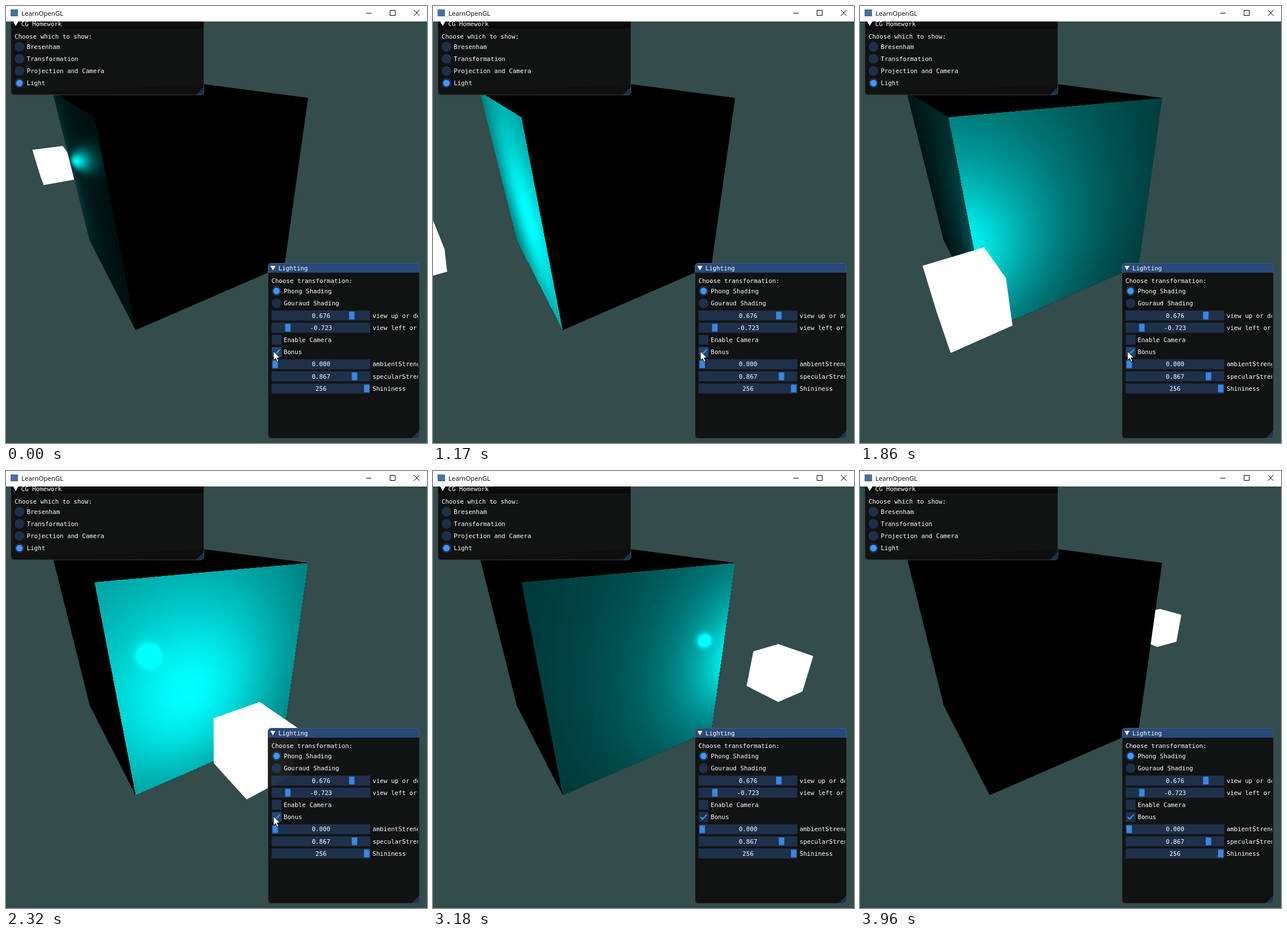
An HTML page with a canvas for the animation above (4.04 s loop, 735 px wide and 762 px high).

```html
<!DOCTYPE html>
<html lang="en">
<head>
<meta charset="utf-8">
<title>LearnOpenGL</title>
<style>
html, body { margin: 0; width: 100%; height: 100%; overflow: hidden; background: #334c4c; }
canvas { display: block; }
</style>
</head>
<body>
<canvas id="stage" width="735" height="762"></canvas>
<script>
const ctx = document.getElementById('stage').getContext('2d');
const SIZE = 735, BAR = 27, MID = SIZE / 2, LOOP = 4040;
const MONO = '10.7px "DejaVu Sans Mono", "Noto Sans Mono", monospace';

// Camera: 70 degree field of view, unit cube at the world origin.
const rad = a => a * Math.PI / 180;
const FOCAL = MID / Math.tan(rad(35));
const EYE = [-0.721, 0.672, 1.598];
const sy = Math.sin(rad(32.4)), cy = Math.cos(rad(32.4));
const sp = Math.sin(rad(30.25)), cp = Math.cos(rad(30.25));
const RIGHT = [cy, 0, sy];
const UP = [sy * sp, cp, -cy * sp];
const AHEAD = [sy * cp, -sp, -cy * cp];
const SPECULAR = 0.867, SHININESS = 256;

const dot = (a, b) => a[0] * b[0] + a[1] * b[1] + a[2] * b[2];
const sub = (a, b) => [a[0] - b[0], a[1] - b[1], a[2] - b[2]];

function project(p) {
  const v = sub(p, EYE), k = FOCAL / dot(v, AHEAD);
  return [MID + dot(v, RIGHT) * k, BAR + MID - dot(v, UP) * k];
}

function hull(points) {
  points.sort((a, b) => a[0] - b[0] || a[1] - b[1]);
  const half = list => {
    const out = [];
    for (const p of list) {
      while (out.length > 1) {
        const a = out[out.length - 2], b = out[out.length - 1];
        if ((b[0] - a[0]) * (p[1] - a[1]) - (b[1] - a[1]) * (p[0] - a[0]) > 0) break;
        out.pop();
      }
      out.push(p);
    }
    out.pop();
    return out;
  };
  return half(points).concat(half(points.slice().reverse()));
}

function poly(points, fill) {
  ctx.beginPath();
  points.forEach(p => ctx.lineTo(p[0], p[1]));
  ctx.closePath();
  ctx.fillStyle = fill;
  ctx.fill();
}

function box(center, h, fill) {
  const pts = [];
  for (const x of [-h, h]) for (const y of [-h, h]) for (const z of [-h, h])
    pts.push(project([center[0] + x, center[1] + y, center[2] + z]));
  poly(hull(pts), fill);
}

// Phong shading of the two visible side faces, traced per pixel.
const AREA = { x: 74, y: 140, w: 460, h: 430 };
const layer = document.createElement('canvas');
layer.width = AREA.w;
layer.height = AREA.h;
const layerCtx = layer.getContext('2d');
const image = layerCtx.createImageData(AREA.w, AREA.h);
const FACES = [{ axis: 2, side: 1 }, { axis: 0, side: -1 }];

function phong(p, face, light) {
  const l = sub(light, p), v = sub(EYE, p);
  const ll = Math.hypot(...l), vl = Math.hypot(...v);
  const nl = l[face.axis] * face.side / ll;
  if (nl <= 0) return 0;
  const nv = v[face.axis] * face.side / vl;
  const shine = Math.max(0, 2 * nl * nv - dot(l, v) / (ll * vl));
  return Math.min(1, nl + SPECULAR * Math.pow(shine, SHININESS));
}

function shade(light) {
  const data = image.data;
  data.fill(0);
  const lit = FACES.filter(f => light[f.axis] * f.side > 0.5);
  for (let j = 0; j < AREA.h; j++) {
    const b = (BAR + MID - AREA.y - j - 0.5) / FOCAL;
    for (let i = 0; i < AREA.w; i++) {
      const a = (AREA.x + i + 0.5 - MID) / FOCAL;
      const d = [0, 1, 2].map(k => RIGHT[k] * a + UP[k] * b + AHEAD[k]);
      for (const f of lit) {
        const t = (0.5 * f.side - EYE[f.axis]) / d[f.axis];
        if (t <= 0) continue;
        const p = [EYE[0] + d[0] * t, EYE[1] + d[1] * t, EYE[2] + d[2] * t];
        if (Math.abs(p[1]) > 0.5 || Math.abs(p[2 - f.axis]) > 0.5) continue;
        const c = Math.round(255 * phong(p, f, light)), o = (j * AREA.w + i) * 4;
        data[o + 1] = data[o + 2] = c;
        data[o + 3] = 255;
      }
    }
  }
  layerCtx.putImageData(image, 0, 0);
}

function scene(angle) {
  const light = [Math.sin(angle), 0, Math.cos(angle)];
  const inFront = light[2] > 0.6 || light[0] < -0.6;
  ctx.fillStyle = '#334c4c';
  ctx.fillRect(0, 0, 735, 762);
  if (!inFront) box(light, 0.1, '#fff');
  box([0, 0, 0], 0.5, '#000');
  shade(light);
  ctx.drawImage(layer, AREA.x, AREA.y);
  if (inFront) box(light, 0.1, '#fff');
}

// Interface widgets
const FRAME = 'rgba(41,74,122,.54)', HOVER = 'rgba(66,150,250,.4)';
const MARK = '#4296fa', GRAB = '#3d85e0';

function text(s, x, y, align = 'left') {
  ctx.font = MONO;
  ctx.textAlign = align;
  ctx.fillStyle = '#fff';
  ctx.fillText(s, x, y);
}

function rect(x, y, w, h, fill) {
  ctx.fillStyle = fill;
  ctx.fillRect(x, y, w, h);
}

function disc(x, y, r, fill) {
  ctx.beginPath();
  ctx.arc(x, y, r, 0, 7);
  ctx.fillStyle = fill;
  ctx.fill();
}

function panel(x, y, w, h, title, bar) {
  ctx.save();
  ctx.beginPath();
  ctx.roundRect(x, y, w, h, 6.4);
  ctx.save();
  ctx.clip();
  rect(x, y + 17, w, h - 17, 'rgba(15,15,15,.94)');
  rect(x, y, w, 17, bar);
  poly([[x + w, y + h], [x + w - 15, y + h], [x + w, y + h - 15]], 'rgba(66,150,250,.25)');
  ctx.restore();
  ctx.beginPath();
  ctx.roundRect(x + 0.5, y + 0.5, w - 1, h - 1, 6.4);
  ctx.strokeStyle = 'rgba(110,110,128,.5)';
  ctx.lineWidth = 1;
  ctx.stroke();
  poly([[x + 4.5, y + 5], [x + 13.5, y + 5], [x + 9, y + 13]], '#fff');
  text(title, x + 18.5, y + 12.8);
  ctx.restore();
}

function radio(x, y, label, on) {
  disc(x, y, 8.4, FRAME);
  if (on) disc(x, y, 5.7, MARK);
  text(label, x + 12.7, y + 4);
}

function check(y, label, on, hover) {
  rect(464, y - 8.5, 17, 17, hover ? HOVER : FRAME);
  if (on) {
    ctx.beginPath();
    ctx.moveTo(467, y);
    ctx.lineTo(470.6, y + 3.8);
    ctx.lineTo(478, y - 4);
    ctx.strokeStyle = MARK;
    ctx.lineWidth = 2;
    ctx.stroke();
  }
  text(label, 484.7, y + 4);
}

function slider(y, value, grab, label) {
  rect(463.5, y - 8.5, 172.5, 17.5, FRAME);
  rect(grab, y - 6.5, 9.5, 13.5, GRAB);
  text(value, 550, y + 4, 'center');
  ctx.save();
  ctx.beginPath();
  ctx.rect(636, y - 9, 83.5, 18);
  ctx.clip();
  text(label, 640, y + 4);
  ctx.restore();
}

function cursor(x, y) {
  const shape = [[0, 0], [0, 16], [3.6, 12.6], [6.4, 18.6], [9, 17.4], [6.3, 11.6], [11.3, 11.6]];
  poly(shape.map(p => [x + p[0], y + p[1]]), '#fff');
  ctx.strokeStyle = '#000';
  ctx.lineWidth = 0.9;
  ctx.stroke();
}

function titleBar() {
  rect(0, 0, 735, BAR, '#fff');
  rect(8, 6, 13, 12, '#4b6f9c');
  ctx.font = '11.3px "Open Sans", "Noto Sans", sans-serif';
  ctx.textAlign = 'left';
  ctx.fillStyle = '#000';
  ctx.fillText('LearnOpenGL', 27, 17);
  ctx.strokeStyle = '#000';
  ctx.lineWidth = 1;
  ctx.beginPath();
  ctx.moveTo(629, 12.5);
  ctx.lineTo(638, 12.5);
  ctx.rect(670.5, 7.5, 9, 9);
  ctx.moveTo(712, 7);
  ctx.lineTo(722, 17);
  ctx.moveTo(722, 7);
  ctx.lineTo(712, 17);
  ctx.stroke();
}

function interfaceLayer(hover) {
  panel(8, 22, 338, 133.5, 'CG Homework', '#0a0a0a');
  text('Choose which to show:', 15, 56.5);
  ['Bresenham', 'Transformation', 'Projection and Camera', 'Light']
    .forEach((s, i) => radio(23.5, 71 + i * 21.15, s, i === 3));

  panel(457, 448, 265.5, 306.5, 'Lighting', '#294a7a');
  text('Choose transformation:', 463.5, 482.5);
  radio(472.3, 497, 'Phong Shading', true);
  radio(472.3, 518.3, 'Gouraud Shading', false);
  slider(539.5, '0.676', 599, 'view up or down');
  slider(560.7, '-0.723', 487.3, 'view left or right');
  check(582, 'Enable Camera', false, false);
  check(603.2, 'Bonus', true, hover);
  slider(624.4, '0.000', 465.3, 'ambientStrength');
  slider(645.5, '0.867', 603.7, 'specularStrength');
  slider(666.7, '256', 625, 'Shininess');
  titleBar();
}

// Bursts of seven steps: start and spacing in ms.
const BURSTS = [[90, 78.3], [620, 80], [1170, 76.7], [1720, 75], [2250, 78.3],
  [2790, 78.3], [3330, 76.7], [3880, 80]];

function stepAt(t) {
  const g = BURSTS.filter(b => b[0] <= t).length - 1;
  if (g < 0) return 0;
  const [start, gap] = BURSTS[g];
  return Math.min(51, 1 + g * 7 + Math.min(6, Math.floor((t - start + 11) / gap)));
}

// The pointer rests on the checkbox, then leaves through the bottom edge.
function pointerAt(step) {
  if (step < 37) return [467, 602];
  const k = step - 37;
  return k < 4 ? [470 + k * 5, 600 + k * 52] : null;
}

let shown = -1;
function tick() {
  const step = stepAt(performance.now() % LOOP);
  if (step !== shown) {
    shown = step;
    scene(rad(-144.6 + step * 4.475));
    interfaceLayer(step < 38);
    const at = pointerAt(step);
    if (at) cursor(at[0], at[1]);
  }
  requestAnimationFrame(tick);
}
tick();
</script>
</body>
</html>
```
